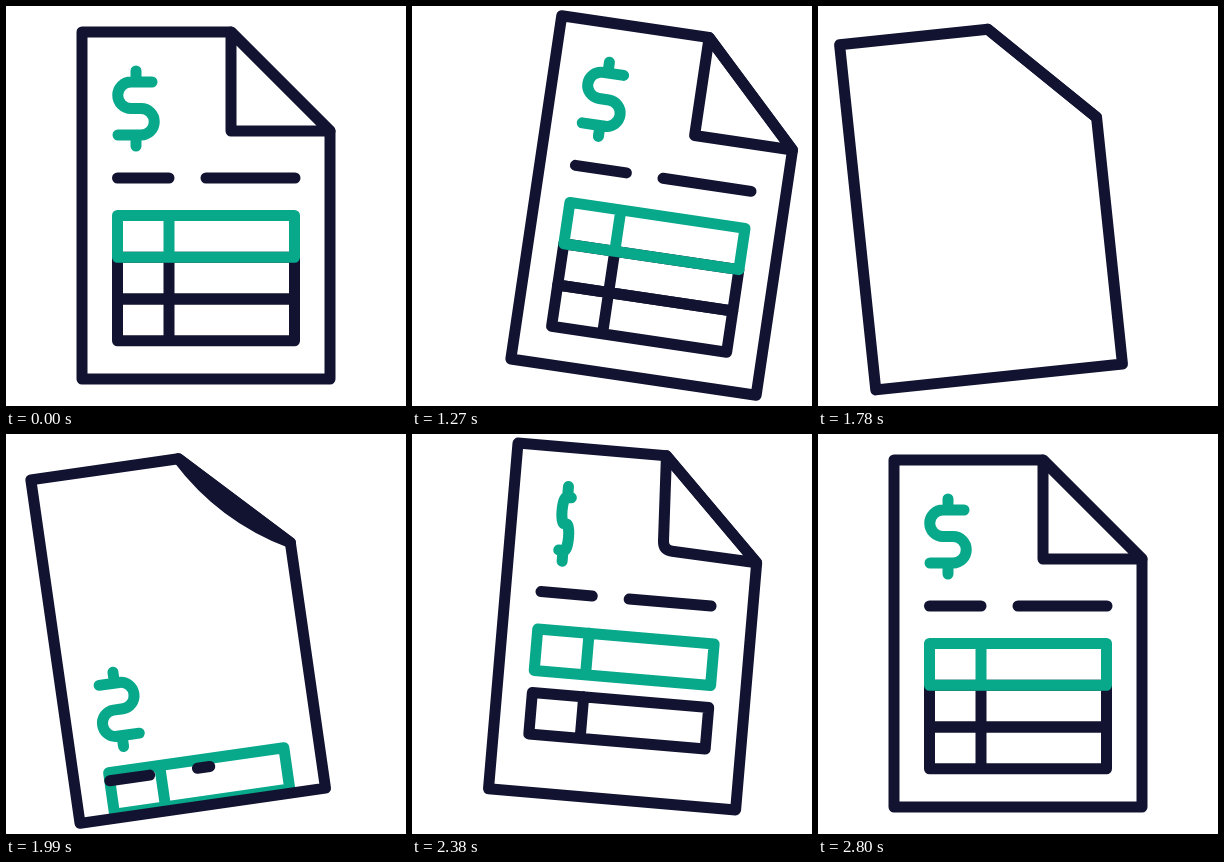
Write an HTML page with a canvas that moves like this. It is 400 px wide and 400 px high and loops after 2.83 s.

```html
<!DOCTYPE html>
<html lang="en">
<head>
<meta charset="utf-8">
<title>Invoice</title>
<style>
html, body { margin: 0; height: 100%; overflow: hidden; background: #fff; }
canvas { display: block; }
</style>
</head>
<body>
<canvas id="stage" width="400" height="400"></canvas>
<script>
const ctx = document.getElementById('stage').getContext('2d');
const NAVY = '#121331', TEAL = '#08a88a';
const LOOP = 2830, HOLD = 1000, STEP = 30, TURNED = 26;

// Keys are [step, value] pairs, eased in and out between neighbours.
const TILT = [[0, 0], [11.5, 9.5], [31, -8.8], [45.3, 4.9], [60, 0]];
const SHIFT_X = [[0, 0], [12, 55], [27, -38], [48, 16], [60, 0]];
const SHIFT_Y = [[0, 0], [10, 0], [18, -4.5], [27, -1], [36, 1], [46, -7], [60, 0]];

const mix = (a, b, u) => a + (b - a) * u;
const mixPoint = (p, q, u) => [mix(p[0], q[0], u), mix(p[1], q[1], u)];

function ease(n, from, to) {
  const u = Math.min(1, Math.max(0, (n - from) / (to - from)));
  return (1 - Math.cos(Math.PI * u)) / 2;
}

function track(keys, n) {
  const i = Math.max(1, keys.findIndex(k => k[0] >= n));
  const [a, b] = [keys[i - 1], keys[i]];
  return mix(a[1], b[1], ease(n, a[0], b[0]));
}

function pagePath() {
  ctx.beginPath();
  [[76, 26], [225, 26], [324, 125], [324, 373], [76, 373]].forEach(p => ctx.lineTo(...p));
  ctx.closePath();
}

function line(x1, x2, y) {
  ctx.beginPath();
  ctx.moveTo(x1, y);
  ctx.lineTo(x2, y);
  ctx.stroke();
}

function dollar(y, flip) {
  const quarter = Math.PI / 2;
  ctx.save();
  ctx.translate(130, y);
  ctx.scale(flip, 1);
  ctx.beginPath();
  ctx.moveTo(16, -26.5);
  ctx.lineTo(-5, -26.5);
  ctx.arc(-5, -13.25, 13.25, -quarter, quarter, true);
  ctx.lineTo(5, 0);
  ctx.arc(5, 13.25, 13.25, -quarter, quarter);
  ctx.lineTo(-18, 26.5);
  ctx.moveTo(0, -37.5);
  ctx.lineTo(0, -26.5);
  ctx.moveTo(0, 26.5);
  ctx.lineTo(0, 37.5);
  ctx.restore();
  ctx.strokeStyle = TEAL;
  ctx.stroke();
}

function row(y, color) {
  ctx.strokeStyle = color;
  ctx.beginPath();
  ctx.rect(111.5, y, 177, 41.75);
  ctx.moveTo(163, y);
  ctx.lineTo(163, y + 41.75);
  ctx.stroke();
}

function content(n) {
  const fresh = n >= TURNED;
  const rise = (dist, from, to) => fresh ? dist * (1 - ease(n, from, to)) : 0;
  const grow = (from, to) => fresh ? ease(n, from, to) : 1;
  const textY = rise(330, 26, 39.9);

  row(293 + rise(150, 40, 56), NAVY);
  row(251.25 + rise(150, 34, 50), NAVY);
  row(209.5 + rise(170, 27, 43), TEAL);
  dollar(102.5 + textY, mix(-1, 1, grow(31, 57)));
  ctx.strokeStyle = NAVY;
  line(111.5, mix(111.5, 163, grow(24, 37)), 172 + textY);
  line(200, mix(200, 289, grow(27.5, 50)), 172 + textY);
}

// Sweeps over the whole sheet, then a new corner curls open and squares up.
function flap(n) {
  let start = [225, 26], end = [324, 125], corner, round = 0;
  if (n < TURNED) {
    corner = mixPoint([225, 125], [76, 373], ease(n, 12.9, TURNED));
    start = [corner[0], 26];
    end = [324, corner[1]];
  } else {
    const open = 0.9 * ease(n, 28, 41) + 0.1 * ease(n, 44, 60);
    corner = mixPoint([274.5, 75.5], [225, 125], open);
    round = 1 - ease(n, 34, 49);
  }
  ctx.beginPath();
  ctx.moveTo(...start);
  ctx.lineTo(...mixPoint(corner, start, round));
  ctx.quadraticCurveTo(...corner, ...mixPoint(corner, end, round));
  ctx.lineTo(...end);
  ctx.lineTo(324, 125);
  ctx.lineTo(225, 26);
  ctx.closePath();
  ctx.fillStyle = '#fff';
  ctx.fill();
  ctx.strokeStyle = NAVY;
  ctx.stroke();
}

function draw(now) {
  const n = Math.max(0, Math.floor((now % LOOP - HOLD) / STEP));
  ctx.clearRect(0, 0, 400, 400);
  ctx.save();
  ctx.translate(200 + track(SHIFT_X, n), 199.5 + track(SHIFT_Y, n));
  ctx.rotate(track(TILT, n) * Math.PI / 180);
  ctx.translate(-200, -199.5);
  ctx.lineWidth = 11;
  ctx.lineCap = ctx.lineJoin = 'round';

  ctx.save();
  pagePath();
  ctx.clip();
  content(n);
  ctx.restore();

  flap(n);
  pagePath();
  ctx.stroke();
  ctx.restore();
}

const began = performance.now();
function tick() {
  draw(performance.now() - began);
  requestAnimationFrame(tick);
}
tick();
</script>
</body>
</html>
```
